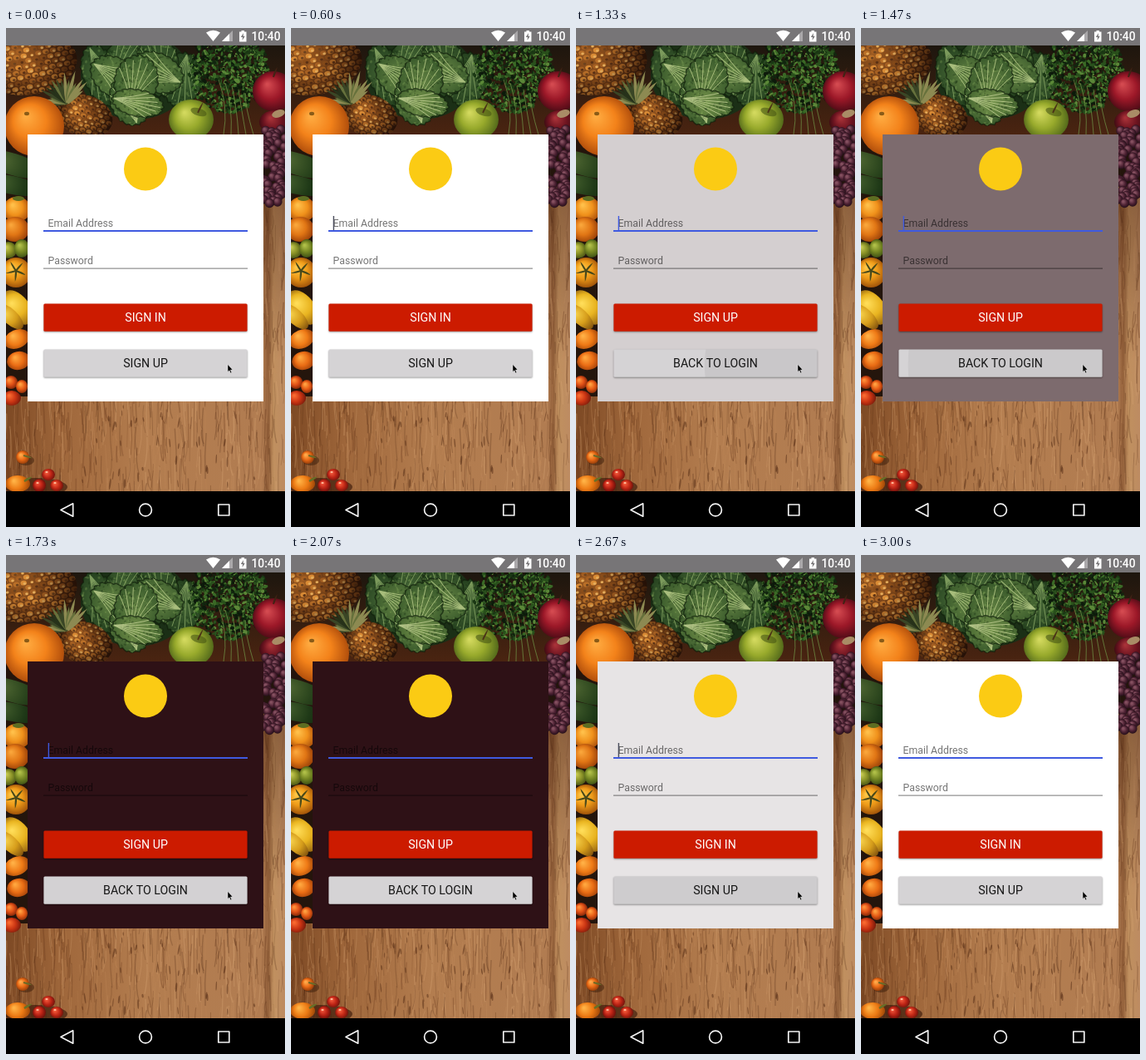
Write an HTML page with a canvas that moves like this. It is 336 by 600 pixels and loops after 3070 ms.

```html
<!DOCTYPE html>
<html lang="en">
<head>
<meta charset="utf-8">
<title>Sign in form</title>
<style>
html, body { margin: 0; width: 100%; height: 100%; overflow: hidden; background: #000; }
canvas { display: block; width: 336px; height: 600px; }
</style>
</head>
<body>
<canvas id="stage"></canvas>
<script>
const W = 336, H = 600, LOOP = 3070, FADE = 500;
const TO_DARK = 1182, TO_LIGHT = 2280;
const LIGHT = [255, 255, 255], DARK = [46, 17, 22];
const BLUE = '#3f5ae0', HINT = 'rgba(0,0,0,.54)';
const dpr = window.devicePixelRatio || 1;
const TAU = Math.PI * 2;

function setup(canvas) {
  canvas.width = W * dpr;
  canvas.height = H * dpr;
  const c = canvas.getContext('2d');
  c.scale(dpr, dpr);
  return c;
}
const ctx = setup(document.getElementById('stage'));
const scene = document.createElement('canvas');
const bg = setup(scene);

let seed = 7;
function rnd(a = 0, b = 1) {
  seed = (seed * 16807) % 2147483647;
  return a + (b - a) * seed / 2147483647;
}
const pick = list => list[Math.floor(rnd() * list.length)];

function oval(c, x, y, rx, ry, fill, turn = 0) {
  c.fillStyle = fill;
  c.beginPath();
  c.ellipse(x, y, rx, ry, turn, 0, TAU);
  c.fill();
}

function poly(c, points, fill) {
  c.fillStyle = fill;
  c.beginPath();
  points.forEach(([x, y]) => c.lineTo(x, y));
  c.closePath();
  c.fill();
}

// Rounded fruit with a lit upper side
function fruit(x, y, rx, ry, light, mid, dark, turn = 0) {
  const r = Math.max(rx, ry);
  const g = bg.createRadialGradient(x - rx * .3, y - ry * .35, 1, x, y, r * 1.08);
  g.addColorStop(0, light);
  g.addColorStop(.5, mid);
  g.addColorStop(1, dark);
  oval(bg, x, y, rx, ry, g, turn);
}

function spike(x, y, len, wide, turn, fill) {
  bg.save();
  bg.translate(x, y);
  bg.rotate(turn);
  bg.fillStyle = fill;
  bg.beginPath();
  bg.moveTo(0, -wide / 2);
  bg.quadraticCurveTo(len * .6, -wide, len, 0);
  bg.quadraticCurveTo(len * .6, wide * .6, 0, wide / 2);
  bg.fill();
  bg.restore();
}

// Crinkled cabbage leaf, veins fan out from its base
function cabbageLeaf(x, y, len, wide, turn, mid, edge, vein) {
  bg.save();
  bg.translate(x, y);
  bg.rotate(turn);
  const g = bg.createRadialGradient(len * .45, 0, 2, len * .5, 0, len * .6);
  g.addColorStop(0, mid);
  g.addColorStop(1, edge);
  bg.beginPath();
  for (let i = 0; i <= 60; i++) {
    const a = i / 60 * TAU, r = 1 + .04 * Math.sin(i * 2.1) + rnd(-.02, .02);
    bg.lineTo(len / 2 - Math.cos(a) * r * len / 2, Math.sin(a) * r * wide / 2);
  }
  bg.closePath();
  bg.fillStyle = g;
  bg.fill();
  bg.strokeStyle = 'rgba(14,28,10,.65)';
  bg.lineWidth = 1.5;
  bg.stroke();
  bg.clip();
  for (let i = 0; i < len * wide / 22; i++) {
    oval(bg, rnd(0, len), rnd(-wide / 2, wide / 2), rnd(1, 2.6), rnd(.7, 1.6), pick(['rgba(20,45,15,.35)', 'rgba(140,175,95,.28)']), rnd(0, 3));
  }
  bg.strokeStyle = vein;
  bg.lineWidth = .9;
  bg.beginPath();
  for (let i = -3; i <= 3; i++) {
    bg.moveTo(2, 0);
    bg.quadraticCurveTo(len * .45, i * wide * .07, len * (.95 - Math.abs(i) * .07), i * wide * .17);
  }
  bg.stroke();
  bg.restore();
}

function pineapple(x, y, rx, ry, turn, step) {
  fruit(x, y, rx, ry, '#9a5a22', '#6b3a16', '#2a160b', turn);
  bg.save();
  bg.beginPath();
  bg.ellipse(x, y, rx, ry, turn, 0, TAU);
  bg.clip();
  bg.translate(x, y);
  bg.rotate(turn);
  for (let v = -rx, row = 0; v < rx; v += step * .7, row++) {
    for (let u = -rx - (row % 2) * step / 2; u < rx; u += step) {
      oval(bg, u, v, step * .42, step * .32, pick(['#b96f28', '#d98b35', '#8a4d1a', '#a55f22']));
      oval(bg, u + 1, v + 1, step * .2, step * .16, pick(['#5a3014', '#e5ad5c', '#6d421d']));
    }
  }
  bg.restore();
  const g = bg.createRadialGradient(x - rx * .2, y - ry * .2, rx * .3, x, y, rx);
  g.addColorStop(0, 'rgba(30,12,4,0)');
  g.addColorStop(1, 'rgba(30,12,4,.7)');
  oval(bg, x, y, rx, ry, g, turn);
}

function wood() {
  const g = bg.createLinearGradient(0, 0, W, 0);
  g.addColorStop(0, '#7d4924');
  g.addColorStop(.2, '#9f673b');
  g.addColorStop(.5, '#b37d4f');
  g.addColorStop(.92, '#b17c51');
  g.addColorStop(.94, '#8e5c37');
  g.addColorStop(.96, '#c0905f');
  g.addColorStop(1, '#bd8b62');
  bg.fillStyle = g;
  bg.fillRect(0, 0, W, 558);
  for (let i = 0; i < 1300; i++) {
    const x = rnd(0, W), y = rnd(190, 550), len = rnd(8, 55);
    bg.strokeStyle = pick(['rgba(95,50,22,.3)', 'rgba(222,172,122,.3)', 'rgba(72,36,15,.25)', 'rgba(200,145,95,.25)']);
    bg.lineWidth = rnd(.5, 1.6);
    bg.beginPath();
    bg.moveTo(x, y);
    bg.quadraticCurveTo(x + rnd(-3, 3), y + len / 2, x + rnd(-3, 3), y + len);
    bg.stroke();
  }
  for (let i = 0; i < 45; i++) {
    oval(bg, rnd(80, 310), rnd(455, 550), rnd(.5, 1.2), rnd(2, 7), 'rgba(70,34,14,.45)', rnd(-.2, .2));
  }
  const s = bg.createLinearGradient(0, 128, 0, 400);
  s.addColorStop(0, 'rgba(60,25,8,.55)');
  s.addColorStop(1, 'rgba(60,25,8,0)');
  bg.fillStyle = s;
  bg.fillRect(0, 128, W, 272);
}

function greens() {
  oval(bg, 156, 58, 66, 52, '#1b2f16');
  const leaves = [
    [100, 22, 78, 44, 1.15], [218, 30, 66, 46, 1.75],
    [122, 72, 82, 52, -.95], [190, 82, 76, 50, -1.75],
    [104, 42, 70, 46, .55], [212, 66, 66, 46, -2.75],
    [158, 116, 62, 48, -1.85], [150, 94, 62, 52, -1.35]
  ];
  leaves.forEach(([x, y, len, wide, turn], i) => {
    const young = i > 3;
    cabbageLeaf(x, y, len, wide, turn, young ? '#638243' : '#436434', young ? '#2f5025' : '#1c3618', young ? '#a8bd7c' : '#7c9a5c');
  });
  cabbageLeaf(128, 84, 62, 32, .2, '#72904a', '#3b5c2a', '#b3c487');

  // Parsley
  for (let i = 0; i < 900; i++) {
    const a = rnd(0, TAU), d = Math.sqrt(rnd());
    const shade = pick(['#12260f', '#1b3814', '#29501c', '#0d1a0b', '#3a6926', '#5b8738']);
    oval(bg, 268 + Math.cos(a) * d * 48, 52 + Math.sin(a) * d * 50, rnd(1, 3.6), rnd(.8, 2.2), shade, rnd(0, 3));
  }
  bg.strokeStyle = 'rgba(111,145,70,.75)';
  bg.lineWidth = 1;
  for (let i = 0; i < 5; i++) {
    bg.beginPath();
    bg.moveTo(256 + i * 8, 62 + i * 4);
    bg.quadraticCurveTo(268 + i * 5, 95, 262 + i * 9, 128);
    bg.stroke();
  }
}

function produce() {
  const g = bg.createLinearGradient(0, 21, 0, 128);
  g.addColorStop(0, '#1d160e');
  g.addColorStop(1, '#4a2411');
  bg.fillStyle = g;
  bg.fillRect(0, 0, W, 128);
  bg.fillStyle = '#24150c';
  bg.fillRect(0, 128, 27, 315);
  bg.fillRect(309, 120, 27, 70);

  pineapple(30, 44, 56, 36, -.2, 9);
  greens();
  pineapple(95, 106, 34, 25, .3, 8);
  for (let i = 0; i < 16; i++) spike(74, 90, rnd(20, 42), 4, -3.2 + i * .17, pick(['#66713c', '#3a4626', '#8d8a52', '#27321a']));

  fruit(34, 118, 36, 36, '#ffac42', '#f3821a', '#a9480a');
  oval(bg, 25, 103, 3, 2.2, '#8a5b17');

  fruit(223, 110, 27, 24, '#d3d95e', '#98aa2c', '#4a6118');
  oval(bg, 232, 101, 10, 4.5, 'rgba(70,85,20,.6)', .3);
  spike(231, 102, 15, 1.8, -1.1, '#4b3317');
  fruit(322, 76, 25, 24, '#d44a50', '#9c1828', '#430a14');
  spike(322, 59, 13, 2, -1.2, '#412315');
  fruit(324, 113, 19, 14, '#a83238', '#6e1420', '#330a10');
  oval(bg, 328, 103, 8, 4.5, '#a98c66', -.3);

  // Grapes
  for (let i = 0; i < 60; i++) {
    const y = 122 + i * 1.5;
    fruit(rnd(309, 338 - Math.max(0, y - 185) * .4), y, 5.6, 5.8, '#855060', '#4d2233', '#1d0c14');
  }

  // Left column
  fruit(9, 164, 40, 13, '#4c6430', '#29431c', '#0f200c', .3);
  fruit(8, 189, 36, 11, '#3f5a2a', '#1f3917', '#0d1c0a', .2);
  fruit(13, 218, 17, 15, '#ffc04a', '#f0911b', '#9c4208');
  fruit(11, 242, 17, 15, '#f9a53a', '#e07514', '#8c3606');
  oval(bg, 15, 205, 7, 3, '#5d6d22');
  fruit(3, 267, 10, 10, '#c5c850', '#8b9328', '#434f14');
  fruit(19, 265, 9, 11, '#b0bf48', '#758622', '#374b14');
  fruit(12, 294, 18, 18, '#ffc746', '#ee9a18', '#974b08');
  for (let i = 0; i < 5; i++) spike(12, 292, 13, 2, i * TAU / 5 + .4, '#47481a');
  fruit(14, 336, 24, 14, '#ffdd58', '#e9b420', '#8a5a10', .9);
  fruit(5, 347, 20, 9, '#f5cf49', '#d69d1b', '#784a0d', .75);
  fruit(13, 374, 16, 11, '#ffb045', '#ef7a16', '#8f3a06', -.4);
  fruit(15, 400, 14, 11, '#ffa63e', '#e96c14', '#8a3406', -.2);
  fruit(6, 426, 8, 8, '#ff8f38', '#df4f16', '#7c2408');
  fruit(19, 431, 7, 8, '#ffa040', '#e65b15', '#842a09');
  fruit(7, 445, 11, 9, '#f9692f', '#c93413', '#6d170a');

  // Loose pieces on the table
  oval(bg, 24, 520, 10, 6, 'rgba(45,20,5,.45)');
  fruit(20, 516, 8, 8, '#ffa848', '#e96a16', '#8d3909');
  spike(21, 514, 11, 2, .3, '#6b6a28');
  oval(bg, 36, 552, 38, 11, 'rgba(50,20,8,.6)');
  fruit(14, 548, 15, 10, '#ffb245', '#ec7a14', '#933f06');
  spike(22, 545, 11, 2.5, -.5, '#667028');
  fruit(51, 537, 8, 7, '#f0563a', '#bd2415', '#65100a');
  fruit(40, 550, 8, 8, '#ee5037', '#b92214', '#5f0e09');
  fruit(61, 550, 8, 7, '#f45a3a', '#c12715', '#65110a');
  for (const [x, y] of [[51, 537], [40, 550], [61, 550]]) oval(bg, x - 2, y - 3, 1.6, 1.1, '#ffc0a0');
}

function systemBars() {
  bg.fillStyle = '#777577';
  bg.fillRect(0, 0, W, 21);
  bg.fillStyle = '#000';
  bg.fillRect(0, 557, W, 43);

  bg.fillStyle = '#fff';
  bg.beginPath();
  bg.moveTo(249.5, 16);
  bg.lineTo(241, 5.6);
  bg.quadraticCurveTo(249.5, 0, 258, 5.6);
  bg.closePath();
  bg.fill();
  poly(bg, [[273, 3], [273, 16], [260, 16]], '#aaa8aa');
  poly(bg, [[269, 7], [269, 16], [260, 16]], '#fff');
  bg.fillStyle = '#fff';
  bg.fillRect(281, 4.5, 8.5, 12);
  bg.fillRect(283.5, 3, 3.5, 2);
  poly(bg, [[286, 6], [282.8, 11], [285, 11], [284.5, 15], [287.8, 9.8], [285.6, 9.8]], '#777577');
  label(bg, '10:40', 330.5, 14.5, 13.8, '#fff', 'right', 500);

  bg.strokeStyle = '#f2f2f2';
  bg.lineWidth = 1.7;
  bg.lineJoin = 'round';
  bg.beginPath();
  bg.moveTo(66, 579.5);
  bg.lineTo(80.7, 571.8);
  bg.lineTo(80.7, 587.2);
  bg.closePath();
  bg.stroke();
  bg.beginPath();
  bg.arc(168, 579.5, 7.4, 0, TAU);
  bg.stroke();
  bg.strokeRect(255.8, 573, 13, 13);
}

function label(c, text, x, y, size, fill, align = 'left', weight = 400) {
  c.font = `${weight} ${size}px Roboto, Arial, sans-serif`;
  c.textAlign = align;
  c.fillStyle = fill;
  c.fillText(text, x, y);
}

function buttonShape(y) {
  ctx.beginPath();
  ctx.roundRect(45.4, y + .4, 245.2, 33.3, 1.5);
}

function button(y, fill) {
  ctx.save();
  ctx.shadowColor = 'rgba(0,0,0,.4)';
  ctx.shadowBlur = 2 * dpr;
  ctx.shadowOffsetY = dpr;
  ctx.fillStyle = fill;
  buttonShape(y);
  ctx.fill();
  ctx.restore();
}

function ripple(age) {
  if (age < 0 || age > 600) return;
  const fade = 1 - Math.max(0, age - 250) / 350;
  ctx.save();
  buttonShape(386);
  ctx.clip();
  oval(ctx, 267, 405, age * .7 + 8, age * .7 + 8, `rgba(0,0,0,${.055 * fade})`);
  ctx.restore();
}

function ease(t) {
  const p = Math.min(1, Math.max(0, t));
  return .5 - .5 * Math.cos(Math.PI * p);
}

function draw(t) {
  ctx.drawImage(scene, 0, 0, W, H);
  const dark = ease((t - TO_DARK) / FADE) - ease((t - TO_LIGHT) / FADE);
  const signUp = t >= TO_DARK && t < TO_LIGHT;

  const mix = LIGHT.map((v, i) => Math.round(v + (DARK[i] - v) * dark));
  ctx.fillStyle = `rgb(${mix})`;
  ctx.fillRect(26, 128, 284, 321);
  oval(ctx, 168, 169.5, 26, 26, '#fbcb14');

  label(ctx, 'Email Address', 50.5, 239, 12.3, HINT);
  label(ctx, 'Password', 50.5, 284, 12.3, HINT);
  ctx.fillStyle = BLUE;
  ctx.fillRect(45, 243, 246, 2);
  ctx.fillStyle = HINT;
  ctx.fillRect(45, 288.6, 246, 1);
  const blink = t % 1000;
  if (blink >= 285 && blink < 785) {
    ctx.fillStyle = dark > .2 ? BLUE : '#4a4d5c';
    ctx.fillRect(50.7, 226, 1.4, 17);
  }

  button(331, '#cc1b00');
  label(ctx, signUp ? 'SIGN UP' : 'SIGN IN', 168, 353, 14.2, '#fff', 'center');
  button(386, '#d5d3d5');
  ripple(t - TO_DARK);
  ripple(t - TO_LIGHT);
  label(ctx, signUp ? 'BACK TO LOGIN' : 'SIGN UP', 168, 408, 14.2, '#161616', 'center');

  // Mouse pointer
  const tip = [[267, 404.5], [267, 413.5], [269, 411.8], [270.4, 415], [271.8, 414.3], [270.4, 411.2], [273, 411]];
  poly(ctx, tip, '#000');
  ctx.strokeStyle = 'rgba(255,255,255,.75)';
  ctx.lineWidth = .6;
  ctx.stroke();
}

wood();
produce();
systemBars();

const start = performance.now();
function tick() {
  draw((performance.now() - start) % LOOP);
  requestAnimationFrame(tick);
}
tick();
</script>
</body>
</html>
```
